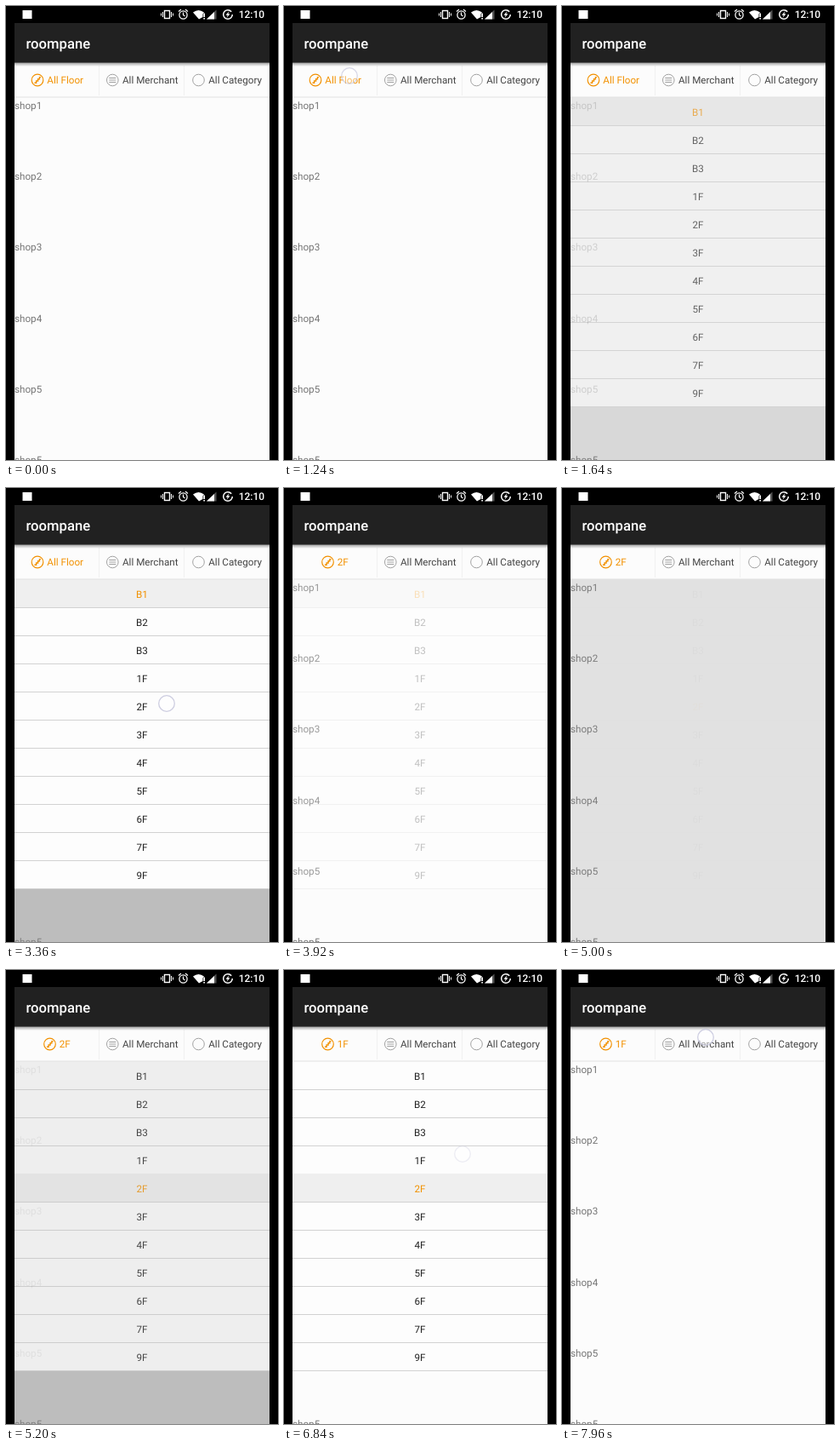
Animation of 320 by 533 pixels, one loop 8000 ms. Source, as an HTML page:

```html
<!DOCTYPE html>
<html lang="en">
<head>
<meta charset="utf-8">
<title>Drop-down filter</title>
<style>
  html, body { margin: 0; width: 100%; height: 100%; overflow: hidden; background: #000; }
  svg { display: block; width: 100%; height: 100%; }
  text { font: 11.67px Roboto, sans-serif; text-rendering: geometricPrecision; }
  .line { fill: none; stroke: currentColor; }
  .accent { color: #f29100; fill: #f29100; }
  .tab { fill: #444; color: #a0a0a0; }
  .title { font-size: 16.67px; font-weight: 500; fill: #fff; }
  .clock { font-size: 12px; font-weight: 500; }
  .shops { fill: #757575; }
  .rows { fill: #222; text-anchor: middle; }

  /* 1% of the loop is 80 ms */
  .anim { animation: 8s linear infinite both; }
  .mask { animation-name: mask; }
  .menu { animation-name: menu; animation-timing-function: ease-in-out; }
  .first { animation-name: first; animation-timing-function: step-end; }
  .second { animation-name: second; animation-timing-function: step-end; }
  .third { animation-name: third; animation-timing-function: step-end; }
  .pick-old { animation-name: pickOld; animation-timing-function: step-end; }
  .pick-new { animation-name: pickNew; animation-timing-function: step-end; }
  .tap1 { animation-name: tap1; }
  .tap2 { animation-name: tap2; }
  .tap3 { animation-name: tap3; }
  .tap4 { animation-name: tap4; }
  .tap5 { animation-name: tap5; }

  @keyframes mask {
    0%, 18%, 45%, 61%, 85.4%, 100% { opacity: 0; }
    22.3%, 42.5%, 64.5%, 82.5% { opacity: 1; }
  }
  @keyframes menu {
    0%, 18%, 51%, 62%, 91%, 100% { opacity: 0; }
    22.3%, 45.5%, 66.5%, 85.6% { opacity: 1; }
  }
  @keyframes first { 0% { opacity: 1; } 43.5%, 100% { opacity: 0; } }
  @keyframes second { 0% { opacity: 0; } 43.5% { opacity: 1; } 83.5%, 100% { opacity: 0; } }
  @keyframes third { 0% { opacity: 0; } 83.5%, 100% { opacity: 1; } }
  @keyframes pickOld { 0% { opacity: 1; } 55%, 100% { opacity: 0; } }
  @keyframes pickNew { 0% { opacity: 0; } 55%, 100% { opacity: 1; } }
  @keyframes tap1 { 0%, 2.99%, 17.5%, 100% { opacity: 0; } 3%, 15% { opacity: 1; } }
  @keyframes tap2 { 0%, 27.99%, 46.5%, 100% { opacity: 0; } 28%, 42% { opacity: 1; } }
  @keyframes tap3 { 0%, 57.99%, 62.5%, 100% { opacity: 0; } 58%, 59% { opacity: 1; } }
  @keyframes tap4 { 0%, 72.49%, 87.5%, 100% { opacity: 0; } 72.5%, 82% { opacity: 1; } }
  @keyframes tap5 { 0%, 96.9% { opacity: 0; } 97% { opacity: .4; } 99.5%, 100% { opacity: 1; } }
</style>
</head>
<body>
<svg viewBox="0 0 320 533" preserveAspectRatio="none">
  <defs>
    <linearGradient id="shade" x2="0" y2="1">
      <stop stop-color="#000" stop-opacity=".4"/>
      <stop offset="1" stop-color="#000" stop-opacity="0"/>
    </linearGradient>
    <clipPath id="screen"><path d="M10 0H310V533H10Z"/></clipPath>
    <g id="stairs" class="line">
      <circle r="6.8" stroke-width="1.2"/>
      <path d="M-3.6 3.2H-1.4V1H.6V-1.2H2.4V-3.4H4" stroke-width="1.4"/>
    </g>
    <circle id="touch" r="9.3" fill="#fff" fill-opacity=".5" stroke="#c6c6dc" stroke-opacity=".85" stroke-width="1.3"/>
  </defs>

  <rect width="320" height="533"/>

  <g id="status" fill="#fff" color="#fff">
    <rect x="19.5" y="5" width="11" height="10"/>
    <rect class="line" x="186.5" y="5.5" width="6" height="9" stroke-width="1.4"/>
    <path class="line" d="M184.500 7V13M182.500 8.500V11.500M194.500 7V13M196.500 8.500V11.500"/>
    <circle class="line" cx="208.500" cy="10.500" r="4.600" stroke-width="1.300"/>
    <path class="line" d="M208.500 7.500V10.500L210.500 12M203 6.500L206 4M214 6.500L211 4" stroke-width="1.200"/>
    <path d="M220 7.500Q226.500 2.500 233 7.500L231.500 9.500V13L227 15.500Z"/>
    <path d="M232.300 8.500H234V13H232.300ZM232.300 14H234V15.600H232.300Z"/>
    <path d="M236 15.500L247.500 4.500V15.500Z" opacity=".35"/>
    <path d="M236 15.500L245 7V15.500Z"/>
    <circle class="line" cx="261" cy="10" r="5.300" stroke-width="1.500" stroke-dasharray="29 4"/>
    <path d="M262.500 6L258.500 10.800H260.800L259.500 14L263.500 9.300H261.300Z"/>
    <text class="clock" x="273.700" y="14.300">12:10</text>
  </g>

  <g clip-path="url(#screen)">
    <rect x="10" y="20" width="300" height="47" fill="#212121"/>
    <text class="title" x="23.500" y="49.500">roompane</text>

    <rect x="10" y="66.500" width="300" height="467" fill="#fcfcfc"/>
    <g class="shops" id="shops"></g>
    <rect class="anim mask" x="10" y="107" width="300" height="426" fill="#888" fill-opacity=".5333"/>

    <g class="anim menu">
      <rect x="10" y="107" width="300" height="364" fill="#fdfdfd"/>
      <g class="rows" id="rows"></g>
    </g>

    <rect x="10" y="106.500" width="300" height="1" fill="#e2e2e2"/>
    <path d="M109.500 70V105M209.500 70V105" stroke="#f0f0f0"/>
    <rect x="10" y="66" width="300" height="5" fill="url(#shade)"/>

    <g class="accent">
      <g class="anim first"><use href="#stairs" x="37" y="87"/><text x="48.300" y="91">All Floor</text></g>
      <g class="anim second"><use href="#stairs" x="51.500" y="87"/><text x="62.700" y="91">2F</text></g>
      <g class="anim third"><use href="#stairs" x="51.500" y="87"/><text x="62.700" y="91">1F</text></g>
    </g>
    <g class="tab">
      <circle class="line" cx="125.300" cy="87" r="6.800"/>
      <path class="line" d="M121.300 84.500H129.300M121.300 87H129.300M121.300 89.500H129.300"/>
      <text x="137" y="91">All Merchant</text>
      <circle class="line" cx="226.500" cy="87" r="6.800"/>
      <text x="238.200" y="91">All Category</text>
    </g>

    <use class="anim tap1" href="#touch" x="77" y="82"/>
    <use class="anim tap2" href="#touch" x="189" y="253"/>
    <use class="anim tap3" href="#touch" x="61" y="86"/>
    <use class="anim tap4" href="#touch" x="210" y="216"/>
    <use class="anim tap5" href="#touch" x="169" y="79"/>
  </g>
</svg>
<script>
  const floors = ['B1', 'B2', 'B3', '1F', '2F', '3F', '4F', '5F', '6F', '7F', '9F'];
  const picks = { B1: 'pick-old', '2F': 'pick-new' };
  const rowHeight = 33;
  const shopGap = 83.33;

  const label = (name, y) => `<text x="160" y="${y + 22}">${name}</text>`;

  // The highlight covers the plain label of the chosen row.
  const highlight = (name, y) => picks[name] ? `
    <g class="anim ${picks[name]}">
      <rect x="10" y="${y}" width="300" height="${rowHeight}" fill="#efefef"/>
      <g class="accent">${label(name, y)}</g>
    </g>` : '';

  document.getElementById('rows').innerHTML = floors.map((name, i) => {
    const y = 107 + i * rowHeight;
    return label(name, y) + highlight(name, y) +
      `<rect x="10" y="${y + rowHeight}" width="300" height="1" fill="#d2d2d2"/>`;
  }).join('');

  document.getElementById('shops').innerHTML = [1, 2, 3, 4, 5, 5].map((n, i) =>
    `<text x="10" y="${120.7 + i * shopGap}">shop${n}</text>`).join('');
</script>
</body>
</html>
```
